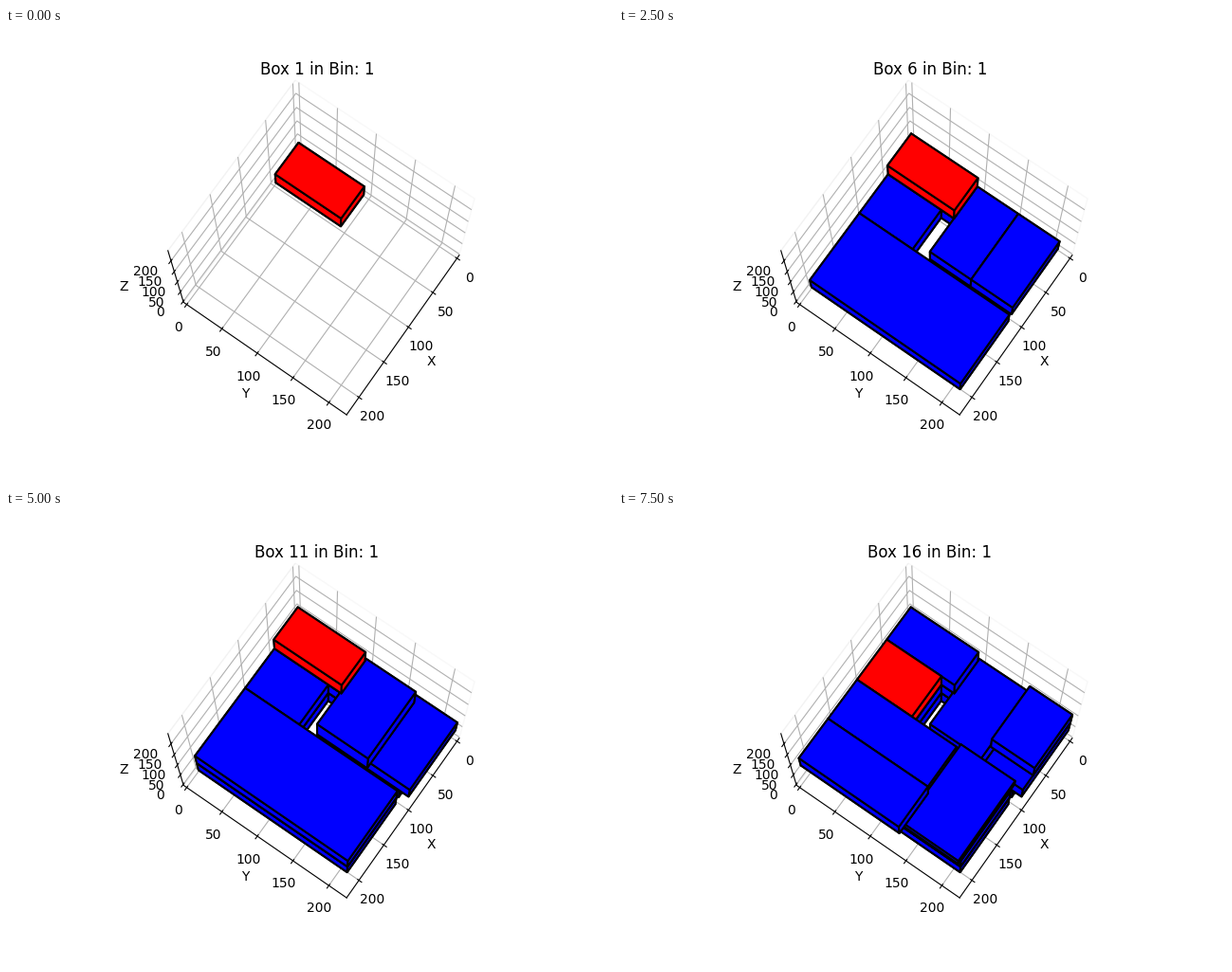
A matplotlib script that plays this animation: 640 px wide and 480 px high, repeating every 8000 ms.

```python
import numpy as np
import matplotlib.pyplot as plt
from matplotlib.animation import FuncAnimation
from mpl_toolkits.mplot3d.art3d import Poly3DCollection

BIN = (220, 220, 240)
H = 36

# Box sizes (dx, dy, dz)
SMALL = (46.8, 92.7, H)
SQUARE = (57.2, 74.7, H)
LARGE = (96.8, 208.7, H)
WIDE = (95, 57.2, H)
TALL = (94.5, 69.3, 48)
LONG = (55.1, 135, H)
FLAT = (110.2, 73, 17)
TURNED = (74.5, 57.2, H)

# Shared packing coordinates
X1 = SMALL[0]
X2 = X1 + SQUARE[0]
Y1 = SMALL[1]
Y2 = Y1 + TALL[1]

# Boxes in packing order: (corner, size)
BOXES = [
    ((0, 0, 0), SMALL),
    ((X1, 0, 0), SQUARE),
    ((X2, 0, 0), LARGE),
    ((0, Y1, 0), WIDE),
    ((0, Y1 + WIDE[1], 0), WIDE),
    ((0, 0, H), SMALL),
    ((X2, 0, H), LARGE),
    ((0, Y1, H), TALL),
    ((0, Y2, H), WIDE),
    ((X1, 0, H), SQUARE),
    ((0, 0, 2 * H), SMALL),
    ((X2, 0, 2 * H), LONG),
    ((X2 + LONG[0], 0, 2 * H), LONG),
    ((95, LONG[1], 2 * H), FLAT),
    ((0, Y2, 2 * H), TURNED),
    ((X1, 0, 2 * H), SQUARE),
]


def box_faces(corner, size):
    """Return the six rectangular faces of a box."""
    corner, size = np.array(corner, float), np.array(size, float)
    square = [(0, 0), (1, 0), (1, 1), (0, 1)]
    return [
        [corner + size * np.insert(np.array(p, float), axis, side) for p in square]
        for axis in range(3)
        for side in (0, 1)
    ]


fig = plt.figure(figsize=(6.4, 4.8), dpi=100)
ax = fig.add_subplot(projection="3d")
ax.view_init(elev=75, azim=35)
ax.set_box_aspect((1, 1, 1))

for name, axis, length in zip("xyz", (ax.xaxis, ax.yaxis, ax.zaxis), BIN):
    pad = length / 48
    ticks = range(0, 201, 50)
    ax.set(**{
        f"{name}ticks": ticks,
        f"{name}lim": (-pad, length + pad),
        f"{name}label": name.upper(),
    })
    axis.pane.fill = False

title = ax.set_title("")
solids = []
for corner, size in BOXES:
    solid = Poly3DCollection(
        box_faces(corner, size), facecolors="blue", edgecolors="black", linewidths=1.5
    )
    solids.append(ax.add_collection3d(solid))


def update(step):
    for i, solid in enumerate(solids):
        solid.set_visible(i <= step)
        solid.set_facecolor("red" if i == step else "blue")
    title.set_text(f"Box {step + 1} in Bin: 1")
    return [title, *solids]


anim = FuncAnimation(
    fig, update, frames=len(BOXES), interval=500, repeat=True, repeat_delay=0
)
plt.show()
```
